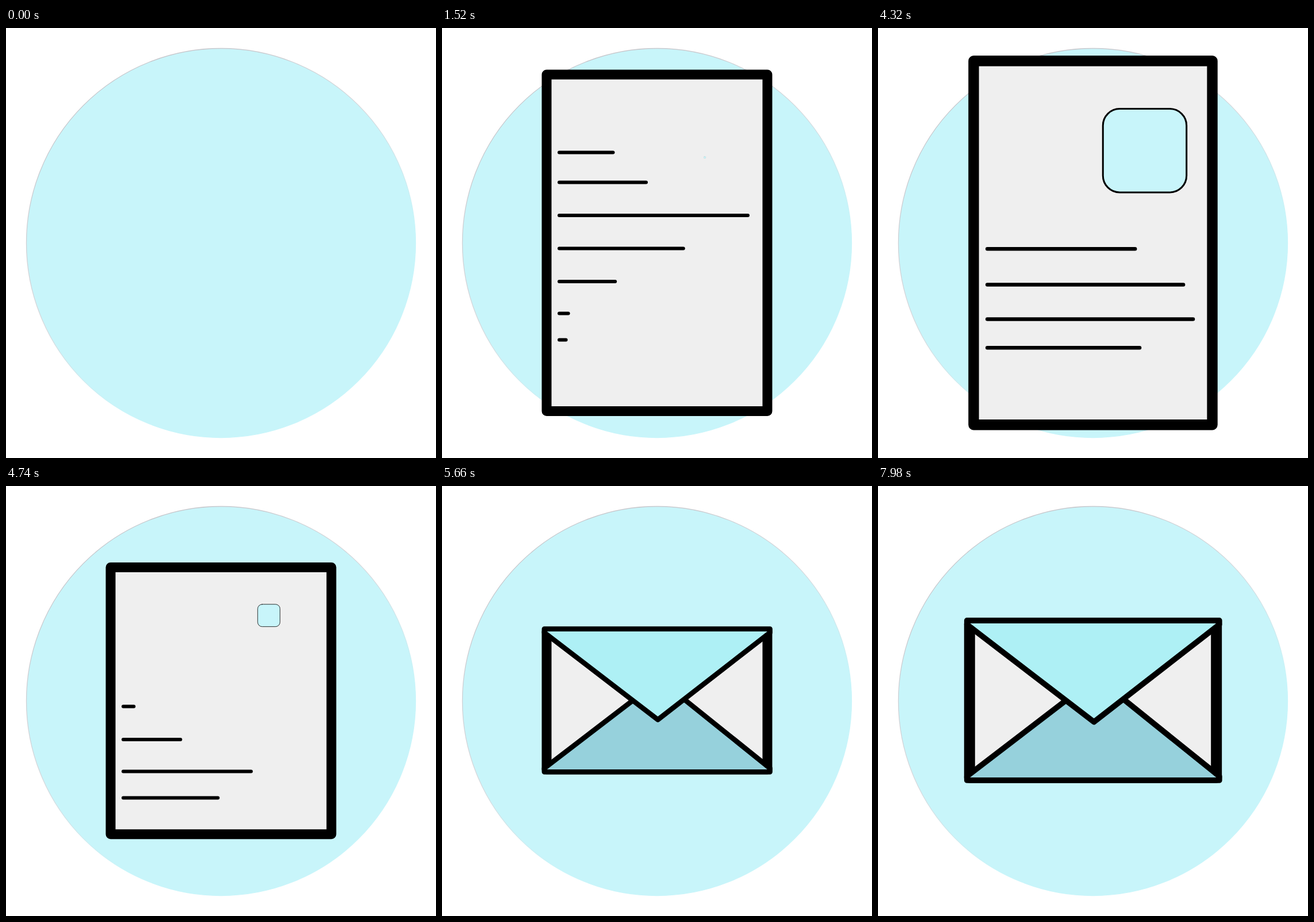
These frames come from a looping animation (748x748 px, 8000 ms). An HTML page:

```html
<!DOCTYPE html>
<html lang="en">
<head>
<meta charset="utf-8">
<title>Letter to envelope</title>
<style>
  html, body { margin: 0; width: 100%; height: 100%; overflow: hidden; background: #fff; }
  svg { display: block; width: 100vw; height: 100vh; }
</style>
</head>
<body>
<svg viewBox="0 0 748 748">
  <defs>
    <linearGradient id="rim" x1="0.2" y1="0" x2="0.75" y2="0.85">
      <stop offset="0" stop-color="#c3c3c8"/>
      <stop offset="0.5" stop-color="#d5d8dc"/>
      <stop offset="0.8" stop-color="#c8f5fa"/>
    </linearGradient>
  </defs>
  <circle cx="374" cy="374" r="338.5" fill="#c8f5fa" stroke="url(#rim)" stroke-width="1.3"/>
  <g id="letter" stroke="#000" stroke-linejoin="round" stroke-linecap="round">
    <rect id="page" x="182" width="384" fill="#efefef" stroke-width="17"/>
    <g id="lines" stroke-width="6"></g>
    <rect id="stamp" x="390" y="158" width="134.5" height="134.5" rx="27" fill="#c8f5fa" stroke-width="2.8"/>
    <path id="lower" fill="#96d1dc" stroke-width="8.8"/>
    <path id="upper" fill="#aef0f5" stroke-width="8.8"/>
  </g>
</svg>
<script>
const LOOP = 8000;
const CX = 374.2, CY = 373.4;
const LEFT = 204;
const $ = id => document.getElementById(id);
const [letter, page, stamp, lower, upper] =
  ['letter', 'page', 'stamp', 'lower', 'upper'].map($);

// y, right end, start and duration; every line is erased 3 s after it is drawn
const LINES = [
  [216.5, 297.5, -20, 520],
  [268.5, 355, 480, 500],
  [326, 532, 780, 520],
  [383.5, 535, 990, 900],
  [441, 535, 1183, 900],
  [496.5, 535, 1383, 900],
  [542.5, 449, 1383, 900]
].map(([y, end, start, dur]) => {
  const el = document.createElementNS('http://www.w3.org/2000/svg', 'path');
  $('lines').append(el);
  return { el, y, end, start, dur };
});

// cubic-bezier(.42, 0, .58, 1)
function ease(x) {
  if (x <= 0) return 0;
  if (x >= 1) return 1;
  let lo = 0, hi = 1;
  for (let i = 0; i < 24; i++) {
    const u = (lo + hi) / 2, v = 1 - u;
    if (1.26 * u * v * v + 1.74 * u * u * v + u * u * u < x) lo = u; else hi = u;
  }
  return lo * lo * (3 - 2 * lo);
}

const ramp = (t, from, to) => ease((t - from) / (to - from));

function zoom(el, k, x, y) {
  el.setAttribute('visibility', k > 0.001 ? 'inherit' : 'hidden');
  el.setAttribute('transform', `translate(${x} ${y}) scale(${k}) translate(${-x} ${-y})`);
}

function flap(el, edge, side, tipX, tipY, alpha) {
  el.setAttribute('d', `M178 ${edge}H570.5V${side}L${tipX} ${tipY}L178 ${side}Z`);
  el.setAttribute('opacity', alpha);
}

function draw(t) {
  const pulse = 0.1 * (ramp(t, 3790, 4205) - ramp(t, 4205, 4590));
  const swell = 0.14 * ramp(t, 7400, 8200);
  zoom(letter, ramp(t, 10, 865) + pulse + swell, CX, CY);

  const fold = ramp(t, 4412, 5212);
  const top = 81 + 173 * fold, bottom = 666.5 - 173.5 * fold;
  page.setAttribute('y', top);
  page.setAttribute('height', bottom - top);

  for (const { el, y, end, start, dur } of LINES) {
    const p = ramp(t, start, start + dur) - ramp(t, start + 3000, start + 3000 + dur);
    el.setAttribute('d', `M${LEFT} ${y}H${LEFT + (end - LEFT) * p}`);
    el.setAttribute('visibility', p > 0.001 ? 'inherit' : 'hidden');
  }

  const pop = 1.3 * ramp(t, 1490, 1810) - 0.3 * ramp(t, 1810, 2290) - ramp(t, 4490, 4890);
  zoom(stamp, pop, 457.2, 225.2);

  const shut = ramp(t, 5020, 5670), alpha = ramp(t, 5020, 5410);
  flap(upper, 248.7, 255, 375.5, 255 + 151.5 * shut, alpha);
  flap(lower, 497.3, 491, 379, 491 - 154 * shut, alpha);
}

const begin = performance.now();
function tick() {
  draw((performance.now() - begin) % LOOP);
  requestAnimationFrame(tick);
}
tick();
</script>
</body>
</html>
```
